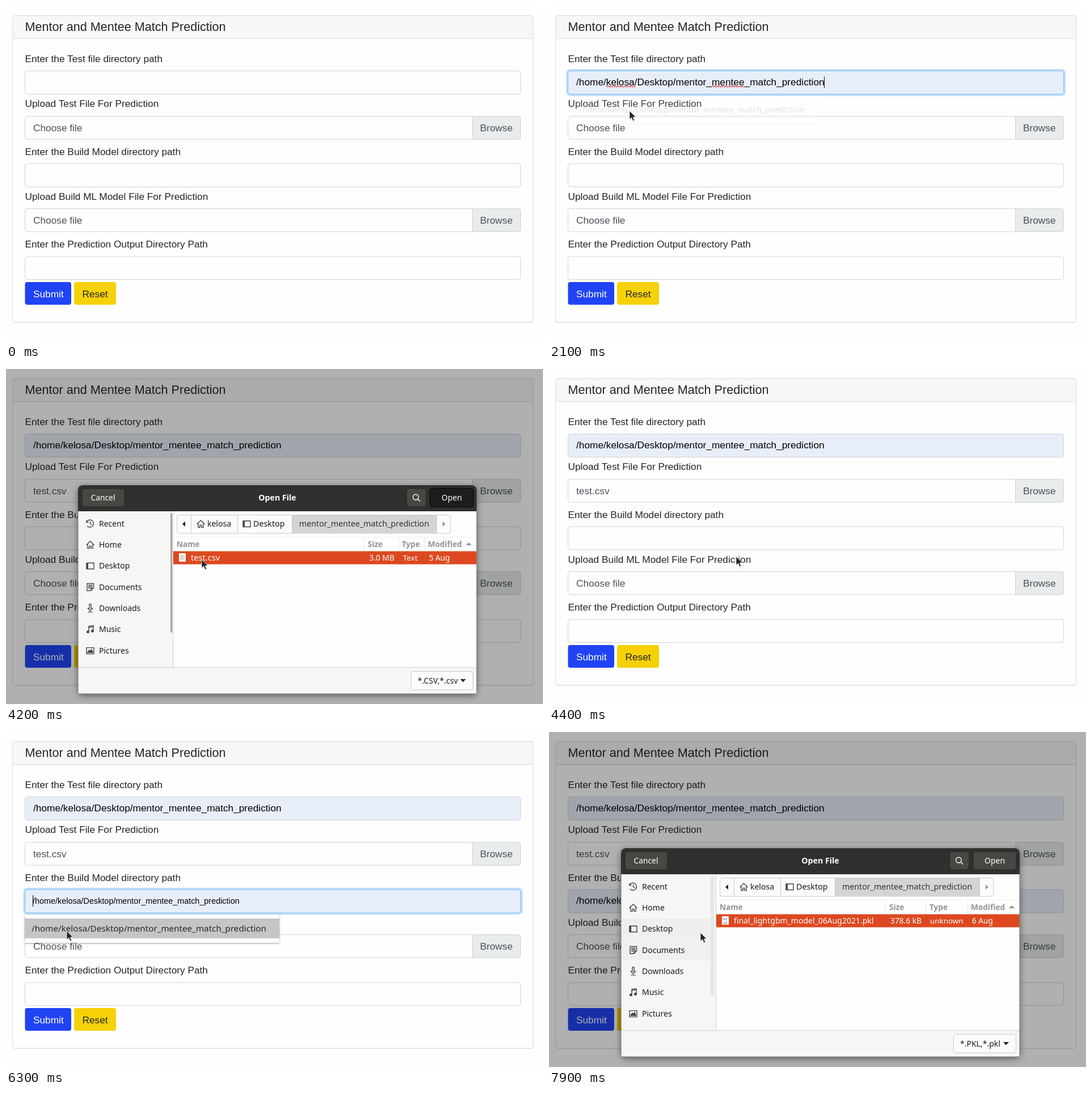
These frames come from a looping animation (947 px wide and 591 px high, 8 s). An HTML page:

```html
<!DOCTYPE html>
<html lang="en">
<head>
<meta charset="utf-8">
<title>Match prediction form</title>
<style>
html, body { margin: 0; width: 100%; height: 100%; overflow: hidden; background: #fefefe; }
svg { display: block; width: 100vw; height: 100vh; }
text { white-space: pre; font-family: "Liberation Sans", Arial, sans-serif; font-size: 17.28px; fill: #212529; }
.ui text { font-family: "Noto Sans", "Open Sans", sans-serif; font-size: 14px; fill: #1c1c1c; }
.ico { fill: none; stroke: #444; stroke-width: 1.4; }
</style>
</head>
<body>
<svg id="stage" viewBox="0 0 947 591" xmlns="http://www.w3.org/2000/svg"></svg>
<script>
const LOOP = 8000, STEP = 100;
const PROJECT = 'mentor_mentee_match_prediction';
const PATH = '/home/kelosa/Desktop/' + PROJECT;
const stage = document.getElementById('stage');

const clamp = v => Math.max(0, Math.min(1, v));
const ramp = (t, from, len) => clamp((t - from) / len);
const easeOut = p => 1 - (1 - p) * (1 - p);

const rect = (x, y, w, h, fill, more = '') =>
  `<rect x="${x}" y="${y}" width="${w}" height="${h}" fill="${fill}" ${more}/>`;
const box = (x, y, w, h, fill, stroke, r = 4) =>
  rect(x, y, w, h, fill, `stroke="${stroke}" rx="${r}"`);
const label = (x, y, s, style = '') => `<text x="${x}" y="${y}" style="${style}">${s}</text>`;
const shape = (d, fill, more = '') => `<path d="${d}" fill="${fill}" ${more}/>`;
const line = (x1, y1, x2, y2, color) =>
  shape(`M${x1} ${y1}L${x2} ${y2}`, 'none', `stroke="${color}"`);
const group = (inner, attrs) => `<g ${attrs}>${inner}</g>`;

// Path inputs that get filled from the suggestion list
const inputs = [
  { y: 114.5, click: 1200, hover: 1500, accept: 1900, blur: 2600 },
  { y: 278, click: 5000, hover: 5600, accept: 6400, blur: 7100 }
];

const dialogs = [
  { open: 2650, close: 4250, press: 3800, name: 'test.csv', size: '3.0 MB', kind: 'Text',
    date: '5 Aug', filter: '*.CSV,*.csv', cols: [631, 692], heads: [638, 698], kindX: 700, nameSize: 14.6 },
  { open: 7150, close: Infinity, press: Infinity, name: 'final_lightgbm_model_06Aug2021.pkl',
    size: '378.6 kB', kind: 'unknown', date: '6 Aug', filter: '*.PKL,*.pkl',
    cols: [593, 664], heads: [600, 671], kindX: 672, nameSize: 14 }
];

// Pointer route: time, x, y
const route = [
  [600, 126, 2], [900, 80, 131], [1200, 80, 131], [1500, 128, 166], [1600, 128, 166],
  [1700, 142, 185], [2100, 142, 185], [2400, 150, 211], [2900, 150, 211], [3400, 296, 331],
  [3700, 345, 336], [4300, 345, 336], [4400, 330, 331], [4500, 300, 310], [4600, 300, 310],
  [4700, 240, 262], [4900, 82, 298], [5400, 82, 298], [5700, 105, 349], [5900, 105, 349],
  [6000, 121, 363], [6200, 121, 363], [6300, 107, 351], [6400, 107, 351], [6700, 107, 403],
  [6800, 107, 403], [6900, 92, 372], [7400, 92, 372], [7700, 180, 380], [7900, 267, 354]
];

function pointerAt(t) {
  const i = route.findIndex(k => k[0] > t);
  if (i < 0) return route[route.length - 1].slice(1);
  const [t0, x0, y0] = route[i - 1], [t1, x1, y1] = route[i];
  const p = (t - t0) / (t1 - t0);
  return [x0 + (x1 - x0) * p, y0 + (y1 - y0) * p];
}

function pointer(t) {
  if (t < 600) return '';
  const [x, y] = pointerAt(t);
  const beam = (t >= 900 && t < 1500) || (t >= 4900 && t < 5500);
  const d = beam
    ? 'M-4-10Q0-10 0-8Q0-10 4-10M0-8V8M-4 10Q0 10 0 8Q0 10 4 10'
    : 'M0 0V15.2L3.6 11.9 6.2 18 8.8 16.8 6.3 11H11.2Z';
  return shape(d, beam ? 'none' : '#222',
    `stroke="${beam ? '#222' : '#fff'}" stroke-width="${beam ? 1.3 : .8}" transform="translate(${x} ${y})"`);
}

function squiggle(x, w, y) {
  const waves = 'q1 -2 2 0t2 0'.repeat(Math.round(w / 4));
  return shape(`M${x} ${y}${waves}`, 'none', 'stroke="#e0383e" stroke-width="1.1"');
}

function pathInput(t, f) {
  const { y } = f, base = y + 25;
  const ring = ramp(t, f.click - 50, 100) * (1 - ramp(t, f.blur - 50, 100));
  const done = t >= f.accept, filled = t >= f.hover;
  let s = '';
  if (ring) s += rect(32, y - 1.5, 877.5, 44, 'none', `rx="5.5" stroke="#bfdefd" stroke-width="3.4" opacity="${ring}"`);
  s += box(33.5, y, 874, 41, filled ? '#e7eefa' : '#fefefe', ring > .4 ? '#80bdfa' : '#ced4da');
  if (done) s += label(48, base, PATH, 'fill:#000');
  else if (filled) s += label(47, base, PATH, 'fill:#000;font-size:14.4px');
  if (ring && done) s += squiggle(100.5, 50, base + 2.5) + squiggle(287.5, 57, base + 2.5);
  const caret = t >= f.click && t < f.accept + 500;
  if (caret) s += line(done ? 485.5 : 47.5, y + 10, done ? 485.5 : 47.5, y + 30, '#000');
  return s;
}

function suggestion(t, f) {
  const show = ramp(t, f.click + 50, 100), gone = ramp(t, f.accept, 230);
  if (!show || gone === 1) return '';
  const y = f.y + 44, cy = y + 25;
  const scale = 1 - .1 * (1 - show) - .046 * gone;
  const active = t >= f.hover && !gone;
  const inner = rect(33, y, 449, 50, '#fefefe', 'filter="url(#soft)"') +
    (active ? rect(33, y + 7, 449, 35, '#c4c5c4') : '') +
    `<svg x="33" y="${y}" width="437" height="50">` +
    label(12, 30, PATH, 'font-size:15.2px;font-weight:500;fill:#26292b') + '</svg>';
  return group(inner, `class="ui" opacity="${show * (1 - gone)}" ` +
    `transform="translate(257.5 ${cy}) scale(${scale}) translate(-257.5 ${-cy})"`);
}

function fileInput(y, name) {
  return box(33.5, y, 874, 40.5, '#fefefe', '#ced4da') +
    shape(`M822.5 ${y}H903.5a4 4 0 0 1 4 4V${y + 36.5}a4 4 0 0 1-4 4H822.5Z`, '#e9ecec', 'stroke="#ced4da"') +
    label(48, y + 26, name, 'fill:#495057') + label(836, y + 26, 'Browse', 'fill:#495057');
}

function button(x, w, fill, name, color) {
  return rect(x, 487, w, 40, fill, 'rx="4"') + label(x + 14.5, 513.5, name, `fill:${color}`);
}

function page(t) {
  return rect(0, 0, 947, 591, '#fefefe') +
    box(11.5, 17, 918, 541, '#fefefe', '#dcdcdc') +
    shape('M12 57V21a4 4 0 0 1 4-4H925a4 4 0 0 1 4 4V57Z', '#f7f7f7') +
    box(11.5, 17, 918, 541, 'none', '#dcdcdc') + line(12, 57.5, 929, 57.5, '#d8d8d8') +
    label(33.5, 44, 'Mentor and Mentee Match Prediction', 'font-size:21.6px') +
    label(33.5, 98.5, 'Enter the Test file directory path') +
    label(33.5, 178, 'Upload Test File For Prediction') +
    label(33.5, 262.5, 'Enter the Build Model directory path') +
    label(33.5, 342, 'Upload Build ML Model File For Prediction') +
    label(33.5, 426, 'Enter the Prediction Output Directory Path') +
    fileInput(194.5, t >= 4200 ? 'test.csv' : 'Choose file') +
    fileInput(357.5, 'Choose file') +
    inputs.map(f => pathInput(t, f)).join('') +
    box(33.5, 442, 874, 40.5, '#fefefe', '#ced4da') +
    button(33.5, 81.5, '#2044f3', 'Submit', '#fff') +
    button(120, 74, '#f6d108', 'Reset', '#212529') +
    inputs.map(f => suggestion(t, f)).join('');
}

const icons = {
  Recent: 'M1 5A6.5 6.5 0 1 1 2 12M1 2V5.5H4.5M7.5 4V8L10.5 10',
  Home: 'M.5 8.5L7.5 1.5 14.5 8.5M3 7V14H6V10H9V14H12V7',
  Desktop: 'M1 2.5H14V13H1ZM3 2.5V13',
  Documents: 'M2 1.5H13.5V9L9 14H2ZM4 4.5H11.5M4 7H11.5M4 9.5H8M9 14V9.5H13.5',
  Downloads: 'M6 .5H9V8H11.5L7.5 12 3.5 8H6ZM3.5 14.5H11.5',
  Music: 'M5 12V2L13 1V10M5 4L13 3',
  Pictures: 'M1 2.5H14V13.5H1ZM3 11L6 7 8 9 10 6 12 11Z'
};

function icon(name, x, y) {
  let s = shape(icons[name], 'none');
  if (name === 'Music') s += '<circle cx="3.5" cy="12" r="1.8" fill="#444"/><circle cx="11.5" cy="10.5" r="1.8" fill="#444"/>';
  if (name === 'Desktop') s += rect(1, 2.5, 3, 10.5, '#444', 'stroke="none"');
  if (name === 'Pictures') s += shape('M3 11L6 7 8 9 10 6 12 11Z', '#444');
  return group(s, `class="ico" transform="translate(${x} ${y})"`);
}

function sidebar(t, second) {
  let s = rect(127, 251, 167, 275, '#f6f6f5');
  if (second && t >= 7600) {
    const fade = ramp(t, 7700, 300);
    s += rect(127, 329, 160, 36.5, '#ececeb', `opacity="${fade}"`) +
      rect(127, 366, 160, 36.5, '#ececeb', `opacity="${t < 7800 ? 1 : .5}"`);
  }
  Object.keys(icons).forEach((name, i) => {
    const y = 272.5 + i * 37.35;
    s += icon(name, 141, y - 7.5) + label(164, y + 5, name, 'font-size:14px');
  });
  if (second && t >= 7800) s += rect(285, 254, 6, 211, '#e6e6e4', 'rx="3"');
  if (!second && t >= 3200) s += rect(290, 254, 3.2, 211, '#a6a6a4', 'rx="1.6"');
  return s + line(294.5, 251, 294.5, 526, '#d3d0cd');
}

function crumbs() {
  const edge = '#cdc9c5';
  return box(301.5, 257.5, 482.5, 32.5, '#fbfbfa', edge) + rect(505, 258, 254, 31.5, '#d4d4d2') +
    [326.5, 408.5, 504.5, 759.5].map(x => line(x, 257.5, x, 290, edge)).join('') +
    shape('M316 269V278L311 273.5Z', '#222') + shape('M770 269V278L775 273.5Z', '#999') +
    icon('Home', 336, 265.5) + label(355, 278, 'kelosa') +
    icon('Desktop', 417, 265.5) + label(436, 278, 'Desktop', 'font-size:14.3px') +
    label(517, 278, PROJECT, 'font-size:14.2px;fill:#333');
}

function fileList(d) {
  const gray = 'font-weight:bold;font-size:13.6px;fill:#929595';
  const white = 'fill:#fff';
  const binary = d === dialogs[1];
  return rect(295, 251, 535, 275, '#fefefe') + crumbs() +
    line(295, 296.5, 830, 296.5, '#eeeeed') +
    [...d.cols, 738].map(x => line(x + .5, 297, x + .5, 321, '#e6e5e4')).join('') +
    label(301, 314, 'Name', gray) + label(d.heads[0], 314, 'Size', gray) +
    label(d.heads[1], 314, 'Type', gray) + label(744, 314, 'Modified', gray) +
    shape('M811 311H821L816 306Z', '#929595') +
    rect(295, 321.5, 535, 23, '#dd4820') +
    rect(305, 325, 12, 15, '#fafafa', 'rx="1"') +
    (binary
      ? label(307, 332, '01', 'font:6px monospace;fill:#555') + label(307, 338.5, '10', 'font:6px monospace;fill:#555')
      : shape('M307 329H313M307 332H315M307 335H315', 'none', 'stroke="#999"')) +
    label(326, 338, d.name, `${white};font-size:${d.nameSize}px`) +
    label(binary ? 657 : 685, 338, d.size, `${white};text-anchor:end;font-size:13.8px`) +
    label(d.kindX, 338, d.kind, `${white};font-size:13.4px`) +
    label(746, 338, d.date, `${white};font-size:13.6px`);
}

function dialogHead(t, d) {
  const press = ramp(t, d.press, 200), btn = '#484744', rim = '#252423', white = 'fill:#fff';
  return shape('M127 251V213a8 8 0 0 1 8-8H822a8 8 0 0 1 8 8V251Z', '#30302e') +
    box(134, 211, 75, 32, btn, rim) + label(149.5, 232, 'Cancel', `${white};font-size:13.8px`) +
    label(478.5, 232, 'Open File', `${white};font-weight:bold;font-size:14.2px;text-anchor:middle`) +
    box(706.5, 211, 34.5, 32, btn, rim) +
    '<circle cx="722.5" cy="226" r="4.8" fill="none" stroke="#fff" stroke-width="1.4"/>' +
    shape('M726 229.5L730 233.5', 'none', 'stroke="#fff" stroke-width="1.6"') +
    box(748, 211, 76, 32, btn, rim) +
    (press ? box(747.5, 210.5, 76.5, 33, '#1d1d1c', '#050505').replace('/>', ` opacity="${press}"/>`) : '') +
    label(786, 232, 'Open', `${white};text-anchor:middle`);
}

function dialog(t, d) {
  const shut = ramp(t, d.close, 120);
  const show = easeOut(ramp(t, d.open, 180)) * (1 - shut);
  const dim = .31 * ramp(t, d.open + 100, 280) * (1 - shut);
  if (!show) return '';
  const second = d === dialogs[1];
  const left = second ? 713.5 : 714.5;
  const inner = rect(127, 205, 703, 368, '#f6f6f5', 'rx="8" filter="url(#deep)"') +
    rect(127, 526, 703, 46.5, '#f6f6f5') + sidebar(t, second) + fileList(d) + dialogHead(t, d) +
    line(127, 526.5, 830, 526.5, '#d3d0cd') +
    shape('M127.5 251V572.5H829.5V251', 'none', 'stroke="#8f8d8b" stroke-opacity=".6"') +
    box(left, 533.5, 823.5 - left, 32.5, '#fbfbfa', '#cdc9c5') +
    label(left + 11.5, 554.5, d.filter) + shape('M801 547H811L806 552.5Z', '#222');
  return rect(0, 0, 947, 591, '#000', `opacity="${dim}"`) +
    group(inner, `class="ui" opacity="${Math.min(1, show * .97 + (show === 1 ? .03 : 0))}" ` +
      `transform="translate(0 389) scale(1 ${show}) translate(0 -389)"`);
}

const defs = `<defs>
  <filter id="soft" x="-5%" y="-20%" width="110%" height="150%"><feDropShadow dx="0" dy="1" stdDeviation="1.6" flood-opacity=".4"/></filter>
  <filter id="deep" x="-5%" y="-10%" width="110%" height="120%"><feDropShadow dx="0" dy="3" stdDeviation="6" flood-opacity=".5"/></filter>
</defs>`;

function draw(t) {
  stage.innerHTML = defs + page(t) + dialogs.map(d => dialog(t, d)).join('') + pointer(t);
}

let last = -1;
const start = performance.now();
function tick() {
  const t = Math.floor(((performance.now() - start) % LOOP) / STEP) * STEP;
  if (t !== last) draw(last = t);
  requestAnimationFrame(tick);
}
tick();
</script>
</body>
</html>
```
